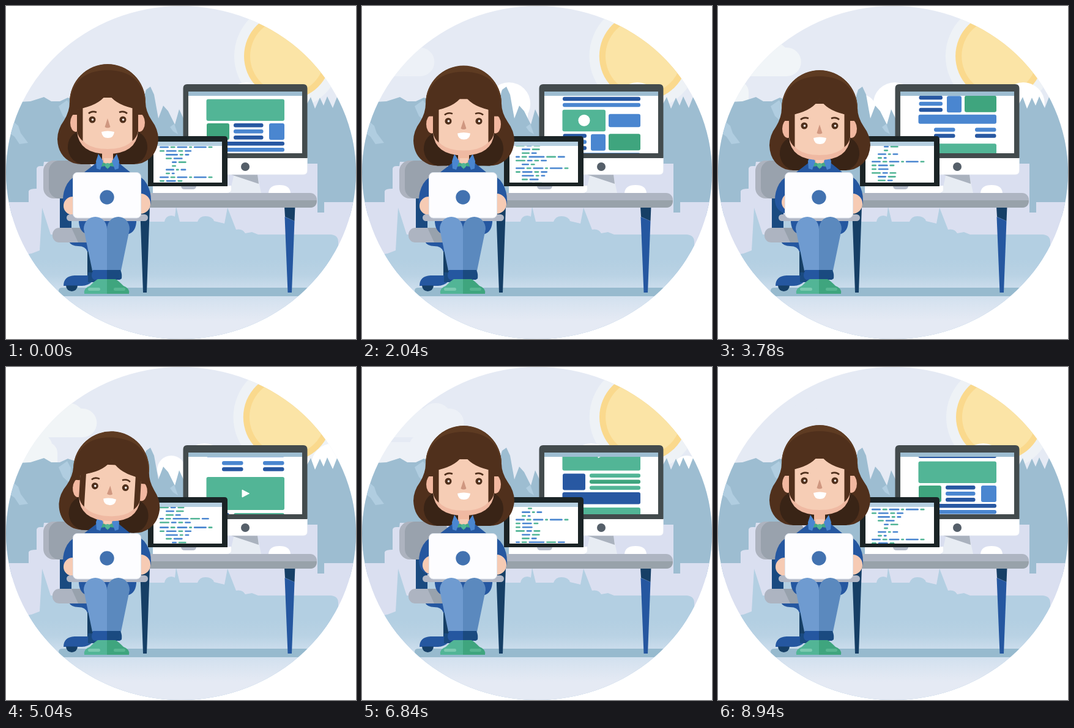
An HTML page that plays this animation: 572x545 px, repeating every 9000 ms.

```html
<!DOCTYPE html>
<html lang="en">
<head>
<meta charset="utf-8">
<title>At the desk</title>
<style>
html, body { margin: 0; width: 100%; height: 100%; overflow: hidden; background: #fff; }
svg { display: block; width: 572px; height: 545px; }
</style>
</head>
<body>
<svg viewBox="0 0 572 545">
<defs>
  <clipPath id="stage"><ellipse cx="286" cy="272.5" rx="286" ry="272.5"/></clipPath>
  <clipPath id="pageClip"><rect x="298" y="147" width="186" height="94"/></clipPath>
  <clipPath id="codeClip"><rect x="241" y="229" width="112" height="60"/></clipPath>
  <linearGradient id="ground" gradientUnits="userSpaceOnUse" x1="0" y1="415" x2="0" y2="515">
    <stop offset="0" stop-color="#b3cfe2"/><stop offset=".25" stop-color="#b9d2e4"/>
    <stop offset=".5" stop-color="#cddeed"/><stop offset="1" stop-color="#e5eaf4"/>
  </linearGradient>
  <g id="puff" fill="#fff">
    <circle cy="160" r="35"/><circle cx="-54" cy="168" r="23"/>
    <rect x="-54" y="160" width="85" height="40"/>
  </g>
</defs>
<g clip-path="url(#stage)">
  <rect width="572" height="545" fill="#e5eaf4"/>

  <g id="sun">
    <circle r="87" fill="#eef2f6"/><circle r="71" fill="#fad98d"/><circle r="61" fill="#fbe4a6"/>
  </g>
  <g id="haze" fill="#f3f6f8">
    <g id="hazeTop"><rect x="-170" y="68" width="170" height="47" rx="23.5"/><circle cx="-46" cy="86" r="27"/></g>
    <g id="hazeLow"><rect x="-150" y="123" width="150" height="60" rx="18"/><circle cx="-32" cy="132" r="24"/></g>
  </g>
  <use href="#puff" id="puffA"/>
  <use href="#puff" id="puffB"/>

  <!-- mountains -->
  <path fill="#9dbdd1" d="M0 168L22 157 40 156 62 149 74 156 88 156 101 150 125 158 222 160 229 137 236 132 242 145 249 184 257 163 265 172 276 194 283 169 291 186H492V160L498 149 505 168 513 150 519 163 525 148 534 167 541 149 552 160 572 180V345H0Z"/>
  <path fill="#b0cde0" d="M8 186L20 196 24 208 36 224 22 226 14 214 6 208ZM86 164L100 154 106 165 104 190 93 180ZM268 198L275 193 281 210 273 205Z"/>

  <!-- far ground -->
  <path fill="#dadff0" d="M0 321H37V303Q38 299 50 299V266Q51 262 56 262L61 262 62 255H160V321H300V258H509V338H520V321H572V545H0Z"/>
  <path fill="#b3cfe2" d="M0 412L42 405 55 400 59 330 73 374H90V352H232L236 353H259Q261 343 270 343 279 343 281 353H313Q316 344 326 344 337 344 340 352L357 356 362 330 376 366Q386 364 391 372L402 370 412 374H531Q543 375 543 386V405L572 415V545H0Z"/>
  <path fill="#b3cfe2" d="M278 328L284 353H275Z"/>
  <rect y="415" width="572" height="130" fill="url(#ground)"/>
  <path fill="#97bace" d="M92 461H572V475H92Q86 470 86 466 86 461 92 461Z"/>

  <!-- chair -->
  <rect x="61" y="253" width="80" height="62" rx="17" fill="#adb3bf"/>
  <rect x="70" y="253" width="71" height="62" rx="17" fill="#99a2ad"/>
  <path fill="#1a4a80" d="M88 315H107V366H88Z"/>
  <path fill="#163f66" d="M133 385H143V442H133Z"/>
  <path fill="#2557a0" d="M103 386H142V402H133Q130 393 118 393 107 393 103 386ZM94 458Q94 442 112 441H142V450Q134 458 124 458Z"/>
  <path fill="#163f66" d="M98 457.500H117A9.500 9.500 0 0 1 98 457.500Z"/>
  <path fill="#1a4a80" d="M134 436H152V452H134Z"/>
  <rect x="76" y="363" width="76" height="24" rx="11" fill="#adb4c1"/>
  <path fill="#98a2ad" d="M107 363H150V387H118Z"/>

  <!-- desk -->
  <path fill="#163f66" d="M219 328H235L230 469H224ZM455 328H472.500L471.500 352 456 345Z"/>
  <path fill="#2557a0" d="M455.500 345L471.500 352 467 469H460.500Z"/>
  <rect x="180" y="306" width="328" height="24" rx="11" fill="#aeb5c2"/>
  <path fill="#98a2aa" d="M180 318H508Q508 330 497 330H180Z"/>
  <path fill="#fff" d="M429 306Q430 293 447 293 464 293 465 306Z"/>

  <!-- monitor -->
  <path fill="#e7ecf3" d="M372 278H411L417 306H366Z"/>
  <path fill="#aab2be" d="M368 276H411L413 291Z"/>
  <path fill="#fff" stroke="#e3e8f0" stroke-width=".6" d="M289.500 248H492.500V269Q492.500 276 486 276H296Q289.500 276 289.500 269Z"/>
  <path fill="#434b4d" d="M296 128H486Q492.500 128 492.500 135V249H289.500V135Q289.500 128 296 128Z"/>
  <rect x="298" y="140" width="186" height="101" fill="#fff"/>
  <rect x="298" y="140" width="186" height="7" fill="#9dbdd1"/>
  <circle cx="391" cy="263" r="7" fill="#555f69"/>
  <g clip-path="url(#pageClip)"><g id="pageRoll"><g id="page"></g><use href="#page" y="323"/></g></g>

  <!-- small laptop -->
  <path fill="#fff" d="M240 294H368V301Q367 306 361 306H240Z"/>
  <path fill="#b5bcca" d="M286 294H311Q311 300 305 300H292Q286 300 286 294Z"/>
  <path fill="#1b2426" d="M237 213H357Q362 213 362 218V295H232V218Q232 213 237 213Z"/>
  <rect x="241" y="222" width="112" height="67" fill="#fff"/>
  <rect x="241" y="222" width="112" height="7" fill="#b5cfe0"/>
  <g clip-path="url(#codeClip)"><g id="code"></g></g>

  <!-- hair behind the body -->
  <g class="head">
    <path fill="#50301c" d="M104 157A62 61.500 0 0 1 228 157Q228 172 238 187 249 202 249 218 247 247 222 257 208 261 190 257L166 225 142 257Q124 261 110 257 85 247 84 218 84 202 95 187 104 172 104 157Z"/>
    <path fill="#392416" d="M118 205Q100 213 101 234 104 254 123 259H209Q228 254 231 234 232 213 214 205Z"/>
  </g>

  <!-- body -->
  <path fill="#2557a0" d="M150 255L128 272Q109 277 100 291 93 303 93 318 94 336 112 340H220Q237 336 237 318 237 303 230 291 222 277 203 272L182 255Z"/>
  <path fill="#f0b9a0" d="M157 232H175V256L166 264 157 256Z"/>
  <path fill="#f6cbb4" d="M160 249H173V255L166 260 160 255Z"/>
  <path fill="#43a985" d="M156 255L166 259 176 255 177 263 170 262 166 267 162 262 155 263Z"/>
  <circle cx="166" cy="261" r="4" fill="#52b596"/>
  <path fill="#4a86d0" d="M151 242L159 254 154 268 148 266 147 254ZM181 242L173 254 178 268 184 266 185 254Z"/>

  <!-- head -->
  <g class="head">
    <ellipse cx="114" cy="191" rx="9" ry="15" fill="#f2b8a0"/>
    <ellipse cx="218" cy="191" rx="9" ry="15" fill="#f2b8a0"/>
    <path fill="#efb9a2" d="M116 150H216V205Q213 242 166 242 119 242 116 205Z"/>
    <path fill="#f6cdb5" d="M116 150H216V196Q213 234 166 234 119 234 116 196Z"/>
    <path fill="#50301c" d="M116 158H125.500V221Q118 215 116 205ZM216 158H206.500V221Q214 215 216 205Z"/>
    <path fill="#5e3b22" d="M104 158A62 63 0 0 1 228 158L216 170Q176 159 166 141 156 159 116 170Z"/>
    <path fill="#50301c" d="M105 160Q108 106 166 105 224 106 227 160L223 178H216V170L206 167Q176 160 166 141 156 160 126 167L116 170V178H109Z"/>
    <g fill="#50301c"><circle cx="141" cy="186" r="5.500"/><circle cx="191" cy="186" r="5.500"/></g>
    <g fill="#fff"><circle cx="141.500" cy="186" r="1.800"/><circle cx="191.500" cy="186" r="1.800"/></g>
    <path fill="none" stroke="#50301c" stroke-width="2.600" d="M135 176Q140 171 148 174M198 176Q193 171 185 174"/>
    <path fill="#cf9780" d="M166 184L170.500 198Q166 201 161.500 198Z"/>
    <path fill="#fff" d="M156 206Q166 203 177 206 176 216 166.500 216 157 216 156 206Z"/>
  </g>

  <!-- hem, hands and laptop -->
  <path fill="#2557a0" d="M119 346H213V354Q211 374 194 374H138Q121 374 119 354Z"/>
  <rect id="handL" x="94" y="312" width="34" height="30" rx="15" fill="#f6cbb4"/>
  <rect id="handR" x="202" y="307" width="34" height="33" rx="16" fill="#f6cbb4"/>
  <rect x="99" y="341" width="133" height="11" rx="5.500" fill="#b2b8c6"/>
  <rect x="109.500" y="272.500" width="111" height="74.500" rx="7" fill="#fdfdff" stroke="#dde3ec"/>
  <circle cx="165" cy="313" r="11.700" fill="#4272b0"/>

  <!-- legs -->
  <path fill="#6f9bd0" d="M127 365A19 20 0 0 1 165 365V433H141Z"/>
  <path fill="#5b89be" d="M165 365A18.500 20 0 0 1 202 365L188 433H165Z"/>
  <path fill="#2557a0" d="M142 432H165V448H144Q140 446 140 440Z"/>
  <path fill="#1a4a80" d="M165 432H187Q190 438 189 446L186 448H165Z"/>
  <path fill="#52b596" d="M128 471Q126 462 137 458 146 449 150 447H165V471Z"/>
  <path fill="#3fa57e" d="M201 471Q203 462 192 458 183 449 179 447H165V471Z"/>
  <rect x="134" y="461" width="20" height="5" rx="2.500" fill="#7bcab0"/>
  <rect x="176" y="461" width="19" height="5" rx="2.500" fill="#58b692"/>
</g>
</svg>
<script>
const LOOP = 9000, PAGE = 323, ROW = 6.14, CODE = 309.3;
const $ = id => document.getElementById(id);
const heads = document.querySelectorAll('.head');
const navy = '#2858a2', blue = '#4a86d0', green = '#52b596', moss = '#3fa57e';

const box = (x, y, w, h, fill, r = 3) =>
  `<rect x="${x}" y="${y}" width="${w}" height="${h}" rx="${r}" fill="${fill}"/>`;
const stack = (x, y, w, fills) =>
  fills.map((fill, i) => box(x, y + i * 10, w, 6.5, fill)).join('');

$('page').innerHTML = [
  box(327.5, 152.5, 127.5, 35.5, green),
  box(328, 192, 37, 27, moss), stack(372, 192, 48.5, [navy, blue, navy]), box(430, 192, 25, 27, blue),
  stack(328, 222, 127, [navy, blue]),
  box(327.5, 243, 70.5, 35.5, green), '<circle cx="363" cy="260.5" r="9.5" fill="#fff"/>',
  box(403, 250, 52, 21.5, blue),
  stack(328.5, 282.5, 38.5, [navy, blue, navy]), box(374, 283, 24, 27, blue), box(403, 282.5, 52, 27, moss),
  box(327.5, 313.5, 127.5, 15, blue),
  stack(353, 335, 34.5, [blue, navy]), stack(420, 335, 34.5, [blue, navy]),
  box(327.5, 361, 127.5, 54, green),
  '<path fill="#fff" stroke="#fff" stroke-linejoin="round" d="M386 382l11.500 6-11.500 6Z"/>',
  box(328, 420, 37, 27, navy), stack(372, 420, 83, [green, moss, green]),
  box(327.5, 450.5, 127.5, 19.5, navy)
].join('');

// Each row: indent, then widths of alternating dashes; "-" starts with green.
const long = '0 15 8 17 5 21 7';
const rows = [
  long, '-0 8 17 8 11', '10 20 6 7', '-10 10 15', '20 8 13', '-20 7', '10 14 5 9', '-10 7 5',
  long, '-0 8 16 8', '-0 8 17', '-0 15 9 11', '10 14 13', '-10 13 9',
  '0 7 9 26 16 12', '-0 16 9 8 10', '10 12 7'
];
const codeRow = (row, y) => {
  let [x, ...widths] = row.replace('-', '').split(' ').map(Number);
  const flip = row[0] === '-' ? 1 : 0;
  x += 251;
  return widths.map((w, k) => {
    const dash = box(x, y, w, 2.6, (k + flip) % 2 ? green : blue, 1.3);
    x += w + 2.7;
    return dash;
  }).join('');
};
const listing = (top, count) =>
  rows.slice(0, count).map((row, i) => codeRow(row, 229.8 + top + i * ROW)).join('');
$('code').innerHTML = listing(0, 17) + listing(104.5, 16) + listing(204.8, 17) + listing(CODE, 17);

const ease = (t, a, b) => {
  const u = Math.min(1, Math.max(0, (t - a) / (b - a)));
  return u * u * (3 - 2 * u);
};
const pulse = (u, mid, half) => {
  const d = Math.abs(u - mid) / half;
  return d < 1 ? (1 + Math.cos(Math.PI * d)) / 2 : 0;
};
const move = (el, x, y = 0, more = '') =>
  el.setAttribute('transform', `translate(${x.toFixed(2)} ${y.toFixed(2)}) ${more}`);

function draw(t) {
  const swell = 1 + 0.012 * (1 - Math.cos(2 * Math.PI * t / 3000));
  move($('sun'), 460, 82, `scale(${swell})`);

  $('haze').setAttribute('opacity', 0.9 * Math.sin(Math.PI * t / LOOP));
  move($('hazeTop'), 98 + 0.01 * t);
  move($('hazeLow'), 0.027 * t - 52);
  move($('puffA'), 183 + 0.028 * t);
  move($('puffB'), 393 + 0.028 * t);

  move($('pageRoll'), 0, -PAGE * t / LOOP);
  move($('code'), 0, -CODE * t / LOOP);

  const drop = 10 * (ease(t, 1500, 3200) - ease(t, 5700, 7120));
  const tilt = 3.4 * (ease(t, 3900, 4800) - ease(t, 5300, 6200));
  heads.forEach(h => move(h, 0, drop, `rotate(${tilt.toFixed(3)} 166 258)`));

  const beat = t / 1500 % 1;
  const left = pulse(beat, 0.52, 0.08), right = pulse(beat, 0.82, 0.08);
  move($('handL'), 10 * left, -6 * left);
  move($('handR'), -8 * right, 0);
}

const start = performance.now();
function tick() {
  draw((performance.now() - start) % LOOP);
  requestAnimationFrame(tick);
}
tick();
</script>
</body>
</html>
```
